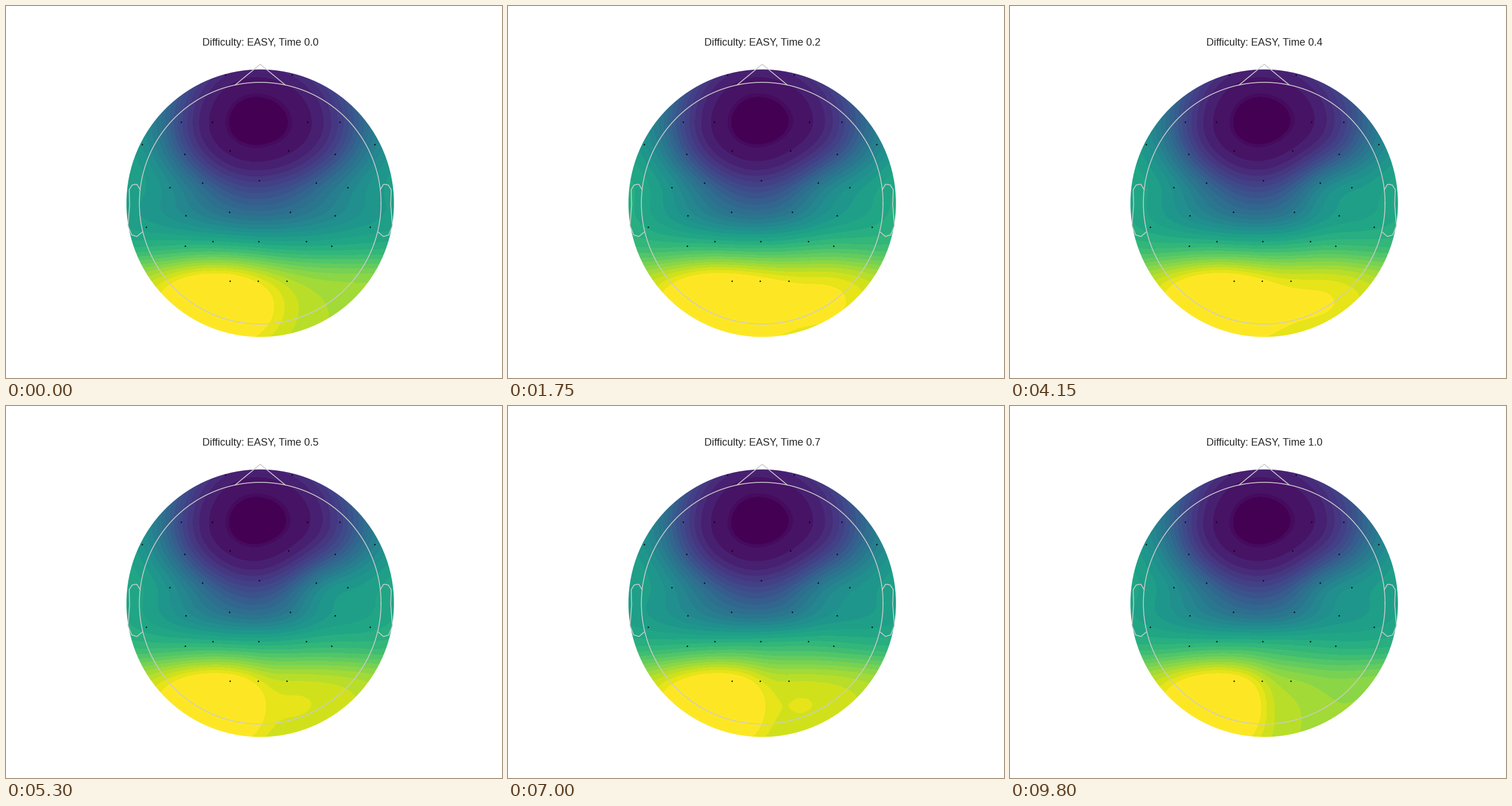
Animation of 864x648 px, one loop 10000 ms. Source, as a matplotlib script:

```python
import numpy as np
import matplotlib.pyplot as plt
from matplotlib.animation import FuncAnimation
from matplotlib.patches import Circle

W, H, DPI = 864, 648, 108
CX, CY = 442.8, 343.5
DISC_R, HEAD_R = 233, 210.5
FRAMES, STEP = 100, 100

# Electrode positions, row by row from the front
SENSOR_ROWS = {
    120: (382, 498), 202: (305, 359, 525, 581), 240.5: (237, 642),
    252: (390, 492), 257.5: (311, 573), 304: (441,), 308: (342, 540),
    316: (285, 595), 359: (389, 495), 365: (313, 573), 385: (244, 634),
    409.5: (360, 440, 523), 418: (312, 567), 479: (390, 439, 489),
}

# Filled bands: a narrow rim round the dark core, then even steps
EDGES = np.append([.025, .03, .068], np.arange(.107, .985, .0335))
MIDS = (np.append(0, EDGES) + np.append(EDGES, 1)) / 2
MIDS[0], MIDS[-1] = 0, 1
COLORS = (plt.cm.viridis(MIDS) * 255).round().astype(np.uint8)

X0, Y0, SIDE = 209, 109, 468
gx, gy = np.meshgrid(X0 + .5 + np.arange(SIDE), Y0 + .5 + np.arange(SIDE))


def sigmoid(z):
    return 1 / (1 + np.exp(-z))


def bump(x, y, sx, sy):
    return np.exp(-((gx - x) / sx) ** 2 / 2 - ((gy - y) / sy) ** 2 / 2)


def resting_field():
    """Frontal well, flat centre, and a rise to the back that peaks on the left."""
    dx, dy = gx - 435, gy - 204
    r = np.hypot(dx * np.where(dx < 0, 1.08, .9),
                 dy * np.where(dy < 0, 1.1, 1.33))
    well = .6 * sigmoid((r - 160) / 35)
    centre = -.13 * bump(440, 362, 150, 32)
    back = .27 * sigmoid((gy - 446) / 16)
    peak = .28 * bump(365, 520, 75, 55)
    return well + centre + back + peak


# Each area rises and falls through a few key levels
KEY_TIMES = [0, 900, 2650, 5300, 7000, 8300, 9800]
TRACKS = [
    (bump(555, 505, 70, 70), [0, .09, .16, .06, .06, -.04, -.03]),
    (bump(455, 520, 30, 45), [0, 0, .05, -.05, -.06, -.06, -.07]),
    (bump(550, 318, 45, 45), [0, .03, .10, .11, .07, .05, .09]),
    (bump(470, 410, 75, 25), [0, .02, 0, .02, .05, .04, .05]),
    (((gx - CX) / DISC_R) ** 2 * np.exp(-((gy - 360) / 85) ** 2),
     [0, .08, .05, .05, .01, .01, .025]),
]
base = resting_field()


def scalp(t):
    field = base.copy()
    for area, levels in TRACKS:
        field += area * np.interp(t, KEY_TIMES, levels)
    return COLORS[np.digitize(field, EDGES)]


fig = plt.figure(figsize=(W / DPI, H / DPI), dpi=DPI, facecolor="white")
ax = fig.add_axes([0, 0, 1, 1])
ax.axis("off")

image = ax.imshow(scalp(0), extent=(X0, X0 + SIDE, Y0 + SIDE, Y0),
                  interpolation="nearest", aspect="auto", zorder=1)
ax.set_xlim(0, W)
ax.set_ylim(H, 0)
image.set_clip_path(Circle((CX, CY), DISC_R, transform=ax.transData))


def outline(x, y):
    """Line in head units: centre at 0, radius 1, y up."""
    ax.plot(CX + HEAD_R * np.asarray(x), CY - HEAD_R * np.asarray(y),
            color="0.8", lw=1, zorder=2)


a = np.linspace(0, 2 * np.pi, 201)
outline(np.cos(a), np.sin(a))
nose = np.radians(12)
outline([-np.sin(nose), 0, np.sin(nose)], [np.cos(nose), 1.15, np.cos(nose)])
ear_x = 2 * np.array([.497, .510, .518, .530, .542, .540, .547, .532, .510, .489])
ear_y = 2 * np.array([.056, .078, .078, .075, .056, -.006, -.093, -.131, -.138, -.120])
outline(ear_x, ear_y)
outline(-ear_x, ear_y)

for y, xs in SENSOR_ROWS.items():
    ax.plot(xs, [y] * len(xs), "o", color="black", ms=1.6, mew=0, zorder=3)
title = ax.text(CX, 68.76, "", family="Liberation Sans", size=12,
                color="0.15", ha="center", va="baseline")


def update(i):
    t = i * STEP
    image.set_data(scalp(t if i > 1 else 0))
    title.set_text(f"Difficulty: EASY, Time {t / 10000 + 1e-9:.1f}")
    return image, title


anim = FuncAnimation(fig, update, frames=FRAMES, interval=STEP,
                     repeat=True, repeat_delay=0, blit=False)
plt.show()
```
